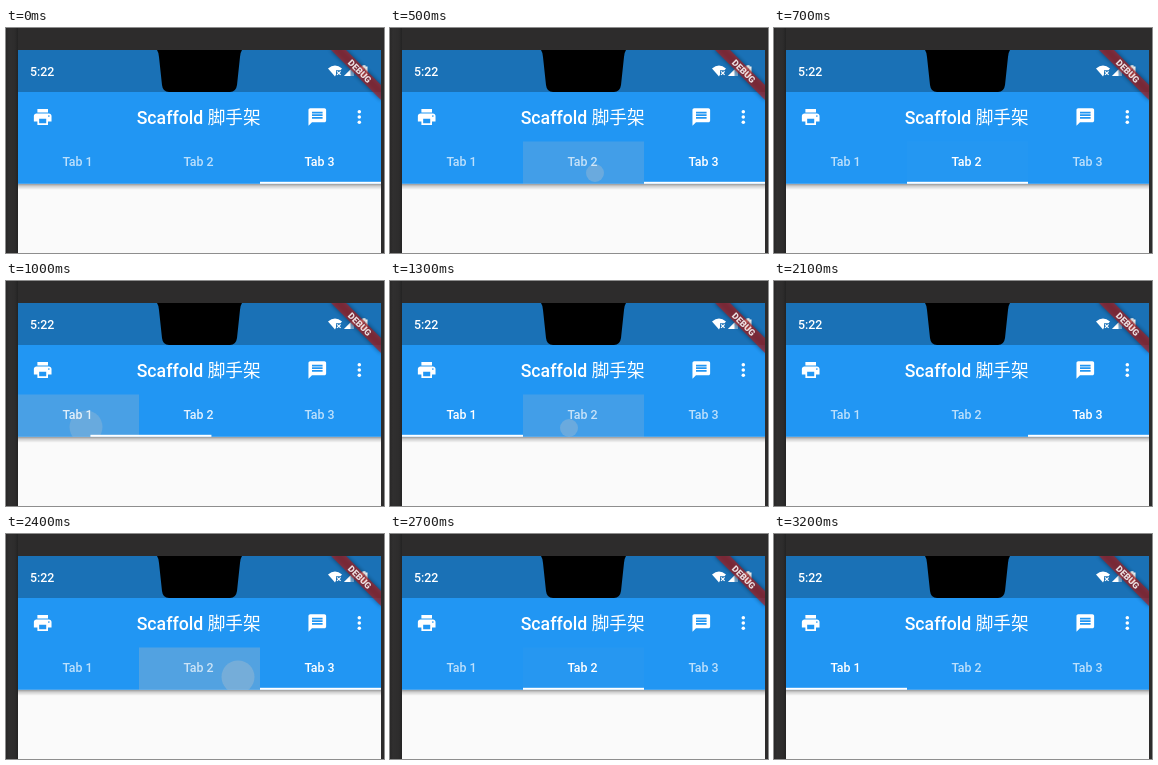
An HTML page for the animation above (3.9 s loop, 378 by 225 pixels).

```html
<!DOCTYPE html>
<html lang="en">
<head>
<meta charset="utf-8">
<title>Tab bar</title>
<style>
  html, body { margin: 0; width: 100%; height: 100%; overflow: hidden; background: #2d2c2c; }
  svg { display: block; width: 378px; height: 225px; }
  text { font-family: Roboto, sans-serif; font-weight: 500; fill: #fff; }
  .title { font-size: 17.66px; }
  .cjk { font-family: "Noto Sans CJK SC", "Noto Sans CJK", sans-serif; font-weight: 400; }
  .label { font-size: 12.36px; text-anchor: middle; }
  .banner { font-size: 9px; font-weight: 900; text-anchor: middle; fill-opacity: .85; }
  .icon { fill: #fff; }
</style>
</head>
<body>
<svg viewBox="0 0 378 225">
  <defs>
    <linearGradient id="edge">
      <stop offset="0" stop-color="#292828"/>
      <stop offset=".25" stop-color="#302f2f"/>
      <stop offset=".75" stop-color="#2d2c2c"/>
      <stop offset="1" stop-color="#232323"/>
    </linearGradient>
    <linearGradient id="shade" x2="0" y2="1">
      <stop offset="0" stop-opacity=".4"/>
      <stop offset=".4" stop-opacity=".17"/>
      <stop offset="1" stop-opacity="0"/>
    </linearGradient>
    <filter id="blur" x="-20%" y="-100%" width="140%" height="300%"><feGaussianBlur stdDeviation="2"/></filter>
    <clipPath id="screen"><rect x="12" y="22" width="363" height="203"/></clipPath>
    <clipPath id="cell"><rect id="cellBox" y="113.4" width="121" height="42.4"/></clipPath>
  </defs>

  <rect width="378" height="225" fill="#2d2c2c"/>
  <rect width="12" height="225" fill="url(#edge)"/>

  <g clip-path="url(#screen)">
    <rect x="12" y="22" width="363" height="203" fill="#fafafa"/>
    <rect x="12" y="155.8" width="363" height="6" fill="url(#shade)"/>
    <rect x="12" y="22" width="363" height="133.8" fill="#2196f3"/>
    <rect x="12" y="22" width="363" height="42" fill="#1a71b6"/>

    <text x="24" y="47.5" font-size="12.4">5:22</text>
    <g class="icon">
      <path d="M322 40.5Q329 34.5 336 40.5L334.5 42.3H330V46.5L329 48.5Z"/>
      <path d="M331 43.3l3.6 3.6m0-3.6l-3.6 3.6" stroke="#fff" stroke-width="1.2"/>
      <path d="M348 38V48H338Z" fill-opacity=".4"/>
      <path d="M344.5 41.5V48H338Z"/>
      <path d="M354.5 38.5h2v-1.3h3v1.3h2v10h-7Z"/>
      <path d="M358.6 40l-2.3 4h1.5v3l2.2-4h-1.4z" fill="#1a71b6"/>
    </g>

    <path d="M151 22Q152.5 24 153 29L156 57Q156.8 64 163 64H224Q230 64 231 57L234 29Q234.5 24 236 22Z"/>

    <g transform="translate(375 22) rotate(45)">
      <rect x="-35.3" y="24.7" width="70.6" height="10.6" opacity=".45" filter="url(#blur)"/>
      <rect x="-35.3" y="24.7" width="70.6" height="10.6" fill="#b71c1c" fill-opacity=".63"/>
      <text class="banner" y="33.2">DEBUG</text>
    </g>

    <g class="icon">
      <path transform="translate(26.1 78.4) scale(.883)" d="M19 8H5c-1.66 0-3 1.34-3 3v6h4v4h12v-4h4v-6c0-1.66-1.34-3-3-3zm-3 11H8v-5h8v5zm3-7c-.55 0-1-.45-1-1s.45-1 1-1 1 .45 1 1-.45 1-1 1zm-1-9H6v4h12V3z"/>
      <path transform="translate(300.7 78.4) scale(.883)" d="M20 2H4c-1.1 0-2 .9-2 2v18l4-4h14c1.1 0 2-.9 2-2V4c0-1.1-.9-2-2-2zm-2 12H6v-2h12v2zm0-3H6V9h12v2zm0-3H6V6h12v2z"/>
      <circle cx="353.3" cy="83.7" r="1.77"/>
      <circle cx="353.3" cy="89" r="1.77"/>
      <circle cx="353.3" cy="94.3" r="1.77"/>
    </g>
    <text class="title" x="130.7" y="95.6">Scaffold <tspan class="cjk">脚手架</tspan></text>

    <g clip-path="url(#cell)">
      <rect id="highlight" x="12" y="113" width="363" height="43" fill="#bcbcbc"/>
      <circle id="ripple" fill="#c8c8c8"/>
    </g>
    <text class="label" x="71.5" y="138">Tab 1</text>
    <text class="label" x="192.5" y="138">Tab 2</text>
    <text class="label" x="313.5" y="138">Tab 3</text>
    <rect id="indicator" y="153.8" width="121" height="2" fill="#fff"/>
  </g>
</svg>
<script>
  const LOOP = 3900, STEP = 100, LEFT = 12, TAB = 121;
  // Press time, slide start and end in ms; rest is the highlight left over afterwards.
  const taps = [
    { tab: 1, down: 500, slide: 500, end: 700, x: 205, y: 145, rest: .02 },
    { tab: 0, down: 900, slide: 950, end: 1200, x: 80, y: 146, rest: 0 },
    { tab: 1, down: 1300, slide: 1300, end: 1500, x: 179, y: 147, rest: .02 },
    { tab: 2, down: 1800, slide: 1850, end: 2100, x: 297, y: 147, rest: 0 },
    { tab: 1, down: 2300, slide: 2450, end: 2700, x: 232, y: 143, rest: .03 },
    { tab: 0, down: 3000, slide: 3000, end: 3200, x: 75, y: 146, rest: 0 }
  ];
  const byId = id => document.getElementById(id);
  const [cellBox, highlight, ripple, indicator] =
    ["cellBox", "highlight", "ripple", "indicator"].map(byId);
  const labels = document.querySelectorAll(".label");
  const clamp = v => Math.min(1, Math.max(0, v));
  const ease = v => 1 - (1 - v) ** 2.3;
  const set = (el, attrs) => {
    for (const name in attrs) el.setAttribute(name, attrs[name]);
  };

  function draw(time) {
    let position = 2, glow = 0, splash = 0;
    for (const tap of taps) {
      if (time < tap.down) break;
      const held = time - tap.down;
      const progress = clamp((time - tap.slide) / (tap.end - tap.slide));
      const fade = 1 - progress;
      position += (tap.tab - position) * ease(progress);
      glow = Math.max(tap.rest, (.21 + .0011 * held) * fade);
      splash = .3 * fade;
      set(cellBox, { x: LEFT + TAB * tap.tab });
      set(ripple, { cx: tap.x, cy: tap.y, r: 9 + .075 * held });
    }
    set(highlight, { "fill-opacity": glow });
    set(ripple, { "fill-opacity": splash });
    set(indicator, { x: LEFT + TAB * position });
    labels.forEach((label, i) =>
      set(label, { "fill-opacity": .7 + .3 * clamp(1 - Math.abs(position - i)) }));
  }

  const start = performance.now();
  function tick() {
    const time = (performance.now() - start) % LOOP;
    draw(Math.floor(time / STEP) * STEP);
    requestAnimationFrame(tick);
  }
  tick();
</script>
</body>
</html>
```
